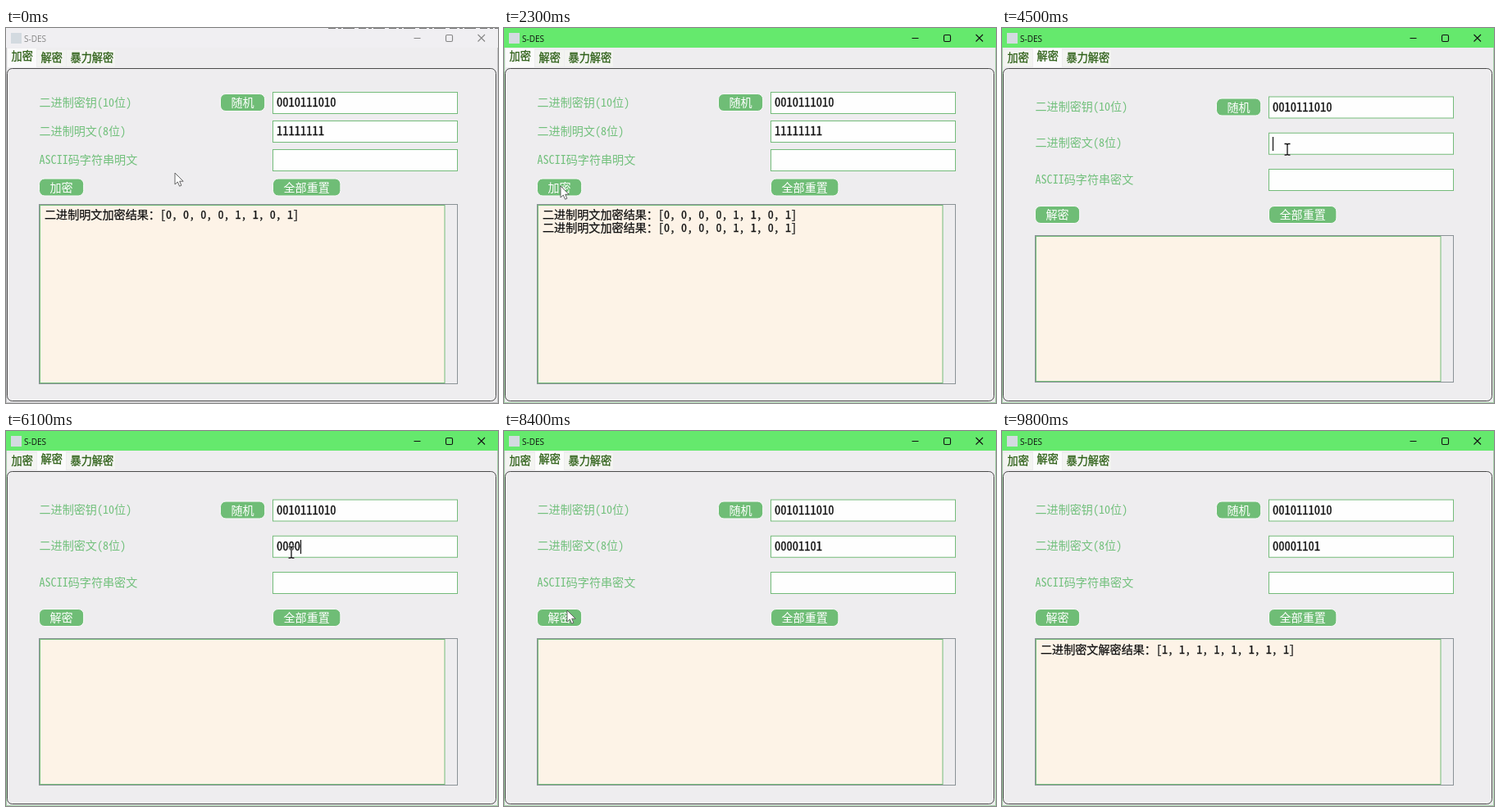
Recreate the animation shown at these times as an HTML page. Size 600 px wide and 458 px high, loop 9900 ms.

```html
<!DOCTYPE html>
<html lang="zh-CN">
<head>
<meta charset="utf-8">
<title>S-DES</title>
<style>
  html, body { margin: 0; width: 100%; height: 100%; overflow: hidden; background: #eeedef; }
  svg { display: block; width: 600px; height: 458px; }
  text { font-family: "Noto Sans Mono CJK SC", "Noto Sans CJK SC", "Noto Sans CJK", monospace; font-size: 14.1px; white-space: pre; }
  .title { font: 10px "Open Sans", "Noto Sans", sans-serif; }
  .tab { font-size: 13.2px; fill: #2f6118; stroke: #2f6118; stroke-width: .3; }
  .label { fill: #72c07c; }
  .caption { fill: #fff; }
  .value, .result { fill: #111; stroke: #111; stroke-width: .35; }
  .value { font-size: 14.5px; }
  .result { stroke-width: .25; }
  .field { fill: #fefefe; stroke: #74bb7a; }
  .button { fill: #6fbd76; stroke: #fafafa; }
  .icons { fill: none; stroke: currentColor; stroke-width: 1.1; }
</style>
</head>
<body>
<svg id="stage" viewBox="0 0 600 458"></svg>
<script>
const LOOP = 9900, STEP = 100;
const KEY = '0010111010', CIPHER = '00001101', DIGIT = 7.25;
const AT = { focus: 2100, encrypted: 2200, tab: 3500, click: 4400, blur: 8500, decrypted: 8600, leave: 9700 };

// Pointer moves; bow bends a move downwards
const HOME = { x: 206, y: 177 };
const MOVES = [
  { from: 0, to: 1100, x: 53, y: 34 },
  { from: 1300, to: 1700, x: 69, y: 193 },
  { from: 2300, to: 3000, x: 53, y: 35 },
  { from: 3600, to: 4400, x: 348, y: 148 },
  { from: 7300, to: 8300, x: 77, y: 219, bow: 60 },
  { from: 8700, to: 9200, x: 108, y: 282 }
];

// The cipher is typed in two bursts of four digits
const snap = t => Math.floor(t / STEP) * STEP;
const keyTime = i => i < 4 ? 5000 + snap(i * 270) : 6300 + (i - 4) * 200;
const keyTimes = [...CIPHER].map((_, i) => keyTime(i));

const text = (cls, x, y, s, extra = '') => `<text class="${cls}" x="${x}" y="${y + 5}" ${extra}>${s}</text>`;
const rect = (x, y, w, h, extra) => `<rect x="${x}" y="${y}" width="${w}" height="${h}" ${extra}/>`;
const button = (x, y, s) =>
  rect(x, y - 10.5, 26 + 14.1 * s.length, 21, 'rx="6.5" class="button"') + text('caption', x + 13, y, s);
const field = (y, id, s) =>
  rect(325.5, y - 12.5, 225, 26, 'class="field"') + text('value', 330, y, s, `id="${id}"`);

function panel(name, action, noun, first, gap, buttonY, top, bottom, values) {
  const labels = ['二进制密钥(10位)', `二进制${noun}(8位)`, `ASCII码字符串${noun}`];
  const rows = labels.map((s, i) => {
    const y = first + i * gap;
    return text('label', 40.5, y - .5, s) + field(y, name + i, values[i]);
  });
  return `<g id="${name}">` + rows.join('') +
    button(261.5, first, '随机') + button(40.5, buttonY, action) + button(325.5, buttonY, '全部重置') +
    rect(40.5, top, 510, bottom - top, 'fill="#eeedef" stroke="#8a9296"') +
    rect(41.5, top + 1, 493.5, bottom - top - 2, 'fill="#fdf3e7" stroke="#74bb7a"') +
    '</g>';
}

const TABS = ['加密', '解密', '暴力解密'];
const tab = (s, i) => {
  const x = 2 + 36 * i;
  return rect(x, 26, 11 + 12 * s.length, 22, `id="tab${i}"`) + text('tab', x + 4.5, 36, s, `id="name${i}"`);
};

const results = (action, noun, bits) => `二进制${noun}${action}结果：[${[...bits].join(', ')}]`;
const encLine = results('加密', '明文', CIPHER);
const decLine = results('解密', '密文', '11111111');

document.getElementById('stage').innerHTML =
  rect(0, 0, 600, 458, 'id="frame"') +
  rect(0, 0, 600, 24, 'id="bar"') +
  rect(1, 24, 598, 433, 'fill="#eeedef"') +
  '<path id="behind" d="M393 .5H600" stroke="#777" stroke-dasharray="9 3 4 2 14 5"/>' +
  rect(6, 6, 13, 13, 'fill="#d3dae0"') +
  `<g id="chrome">${text('title', 22, 11.5, 'S-DES', 'fill="currentColor"')}
    <g class="icons"><path d="M497.5 12.5H505.5M575.5 8L584 16.5M584 8L575.5 16.5"/>
    ${rect(536.5, 8.5, 8, 8, 'rx="1.5"')}</g></g>` +
  TABS.map(tab).join('') +
  rect(1.5, 49.5, 596, 406, 'rx="6" fill="#eeedef" stroke="#4a4a4a"') +
  panel('enc', '加密', '明文', 91, 35, 194.5, 215.5, 434.5, [KEY, '11111111', '']) +
  panel('dec', '解密', '密文', 96.5, 44.25, 228, 253.5, 432.5, [KEY, '', '']) +
  text('result', 47, 228, encLine, 'id="line0"') +
  text('result', 47, 244, encLine, 'id="line1"') +
  text('result', 47, 266.5, decLine, 'id="line2"') +
  '<path id="caret" d="M.5 133V150" stroke="#111" stroke-width="1.2"/>' +
  `<g id="pointer">
    <path id="arrow" d="M0 0V14L3.3 11L5.6 16.2L7.9 15.2L5.7 10.2H10.2Z" fill="#fff" stroke="#555" stroke-width=".9"/>
    <g id="beam" fill="none"><path d="M-3.5-6.5H3.5M0-6.5V7M-3.5 7H3.5" stroke="#fff" stroke-width="2.6"/>
    <path d="M-3.5-6.5H-1L0-5.5L1-6.5H3.5M0-5.5V6M-3.5 7H-1L0 6L1 7H3.5" stroke="#111" stroke-width="1.3"/></g>
  </g>`;

const el = id => document.getElementById(id);
const set = (id, key, value) => el(id).setAttribute(key, value);
const show = (id, on) => set(id, 'visibility', on ? 'visible' : 'hidden');
const ease = k => k * k * (3 - 2 * k);

function pointerAt(t) {
  let { x, y } = HOME;
  for (const m of MOVES) {
    if (t < m.from) break;
    const k = ease(Math.min(1, (t - m.from) / (m.to - m.from)));
    x += (m.x - x) * k;
    y += (m.y - y) * k + (m.bow || 0) * Math.sin(Math.PI * k);
  }
  return [Math.round(x), Math.round(y)];
}

function render(t) {
  const active = t >= AT.focus, second = t >= AT.tab;
  set('frame', 'fill', active ? '#a5cfa8' : '#c4c4c6');
  set('bar', 'fill', active ? '#65e96d' : '#f0eff2');
  el('chrome').style.color = active ? '#111' : '#858585';
  show('behind', !active);

  TABS.forEach((_, i) => {
    const on = i === Number(second);
    set('tab' + i, 'fill', on ? '#fbfbfb' : '#f3f4f1');
    set('tab' + i, 'y', on ? 25 : 27);
    set('tab' + i, 'height', on ? 23 : 20);
    set('name' + i, 'y', on ? 39 : 41);
  });

  show('enc', !second);
  show('dec', second);
  show('line0', !second);
  show('line1', !second && t >= AT.encrypted);
  show('line2', t >= AT.decrypted);

  const typed = keyTimes.filter(k => k <= t).length;
  const lastInput = typed ? keyTimes[typed - 1] : AT.click;
  el('dec1').textContent = CIPHER.slice(0, typed);
  show('caret', t >= AT.click && t < AT.blur && (t - lastInput) % 1000 < 500);
  set('caret', 'transform', `translate(${330 + typed * DIGIT} 0)`);

  const [x, y] = pointerAt(t);
  const overField = x >= 326 && y >= 128 && y <= 154;
  const beam = second && (overField || y >= 254), here = t < AT.leave;
  set('pointer', 'transform', `translate(${x} ${y})`);
  show('arrow', here && !beam);
  show('beam', here && beam);
}

const start = performance.now();
function tick() {
  render(snap((performance.now() - start) % LOOP));
  requestAnimationFrame(tick);
}
tick();
</script>
</body>
</html>
```
